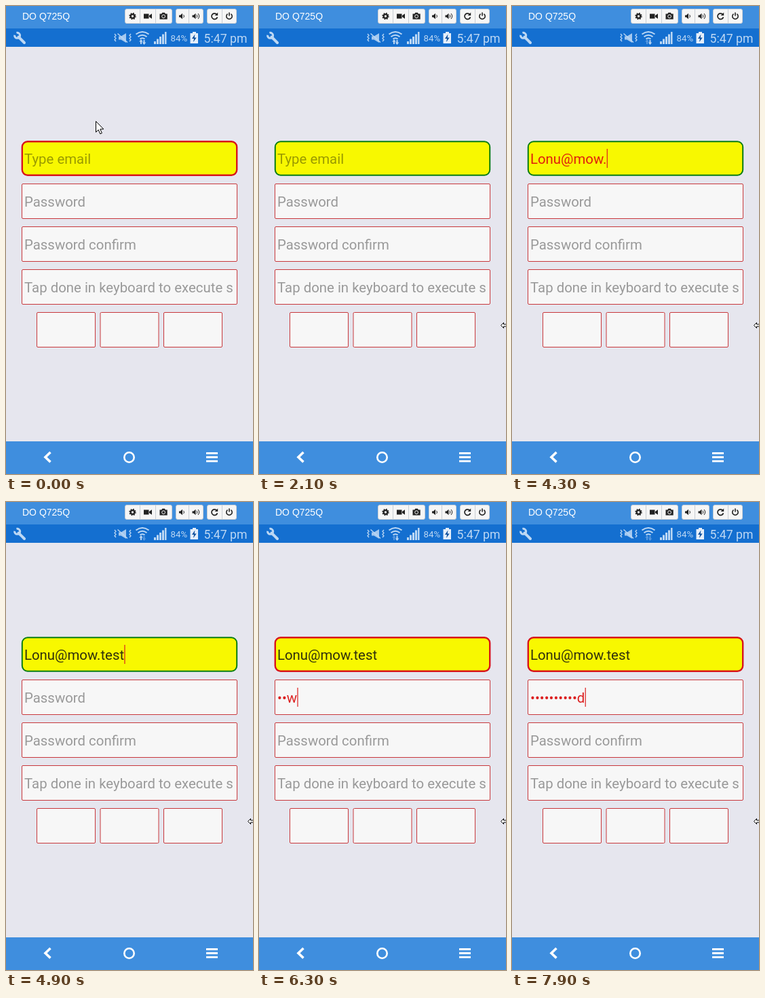
Write an HTML page that moves like this. It is 364 px wide and 688 px high and loops after 8000 ms.

```html
<!DOCTYPE html>
<html lang="en">
<head>
<meta charset="utf-8">
<title>Form validation</title>
<style>
  html, body { margin: 0; width: 100%; height: 100%; overflow: hidden; background: #e6e6ee; }
  svg { display: block; }
  text { font-family: Roboto, sans-serif; white-space: pre; }
  .field { font-size: 20.4px; }
  .hint { fill: rgba(0, 0, 0, .38); }
  .box { fill: #f7f7f7; stroke: #c8383c; }
  .line { fill: none; stroke: currentColor; }
  .status { color: #bdd8f4; fill: #bdd8f4; }
  .tools { color: #222; fill: #222; }
</style>
</head>
<body>
<svg width="364" height="688" viewBox="0 0 364 688">
  <rect width="364" height="688" fill="#e6e6ee"/>
  <rect width="364" height="33" fill="#3f8ede"/>
  <rect y="33" width="364" height="27" fill="#146fd0"/>
  <rect y="640" width="364" height="48" fill="#3f8ede"/>
  <text x="24" y="20" fill="#fff" style="font:14px 'Liberation Sans',Arial,sans-serif">DO Q725Q</text>

  <g class="tools">
    <g fill="#f6f6f6" stroke="#c9ced4">
      <rect x="175.5" y="4.5" width="69" height="21" rx="2.5"/>
      <rect x="250.5" y="4.5" width="40" height="21" rx="2.5"/>
      <rect x="296.5" y="4.5" width="43" height="21" rx="2.5"/>
      <path d="M197.5 5v20M220.5 5v20M269.5 5v20M318.5 5v20"/>
    </g>
    <g class="line">
      <circle cx="186.5" cy="15" r="2.8" stroke-width="2.2"/>
      <circle cx="186.5" cy="15" r="4.4" stroke-width="1.6" stroke-dasharray="1.73"/>
      <path d="M261.5 12.8q2 2.2 0 4.4M281 12.8q2 2.2 0 4.4M283 11q3.4 4 0 8"/>
      <path d="M310.5 12.2a4.3 4.3 0 1 0 1 4" stroke-width="1.7"/>
      <path d="M326.6 11.6a4.2 4.2 0 1 0 4.8 0M329 9.5v5" stroke-width="1.6"/>
    </g>
    <path d="M203 11.5h7.5v7H203zM211 14l4-2.8v7.6l-4-2.8z"/>
    <path d="M226.5 11.5h2.8l1-1.8h3.6l1 1.8h2.8v8h-11.2z"/>
    <circle cx="232.1" cy="15.2" r="2.4" fill="none" stroke="#f6f6f6"/>
    <path d="M255 13.4h2l3-2.7v8.6l-3-2.7h-2zM274.5 13.4h2l3-2.7v8.6l-3-2.7h-2z"/>
    <path d="M312.2 9.5v4.6h-4.6z"/>
  </g>

  <g class="status">
    <path class="line" d="M18.5 45.5l8.5 8.5" stroke-width="4" stroke-linecap="round"/>
    <path class="line" d="M15.5 39.5a4 4 0 1 1-2.8 3.2" stroke-width="3"/>
    <g class="line" stroke-width="1.3">
      <path d="M160 41l2 2.2-2 2.2 2 2.2-2 2.2 2 2.2M184 41l-2 2.2 2 2.2-2 2.2 2 2.2-2 2.2"/>
      <path d="M164.5 40.5l14.500 13"/>
      <path d="M191.5 41.500q9.500-7 19 0M194.500 45.200q6.500-5 13 0M197.500 48.500q3.500-2.600 7 0" stroke-width="2"/>
    </g>
    <path d="M166 44.500h3.500l7.500-4.500v14l-7.500-4.500h-3.500z" opacity=".85"/>
    <path id="up" d="M199 49l2.800 3.500h-1.800v3.500h-2v-3.500h-1.800z"/>
    <path id="down" d="M203.500 57l2.800-3.500h-1.800v-3.500h-2v3.500h-1.800z"/>
    <path d="M218 52h3v4h-3zM222 48.500h3v7.500h-3zM226 45h3v11h-3zM230 41.500h3v14.500h-3zM234 38h2.500v18h-2.500z"/>
    <text x="242.500" y="52" font-size="13.300">84%</text>
    <path d="M275 38h5v2h3v15h-11.500v-15h3.500z" fill="#e4eefa"/>
    <path d="M278.500 41.500l-4.500 6.500h3l-1 5 4.700-6.500h-3z" fill="#0d4f9c"/>
    <text x="291.500" y="53.500" font-size="17.700">5:47 pm</text>
  </g>

  <rect id="emailBox" x="23.800" y="199.300" width="316.400" height="49.400" rx="8" fill="#f8f800"/>
  <g class="box" id="boxes"></g>
  <g class="field">
    <text id="email" x="27" y="232"></text>
    <text id="password" x="27" y="295"></text>
    <text class="hint" x="27" y="358">Password confirm</text>
    <text class="hint" x="27" y="421">Tap done in keyboard to execute s</text>
  </g>
  <rect id="caret" width="1.200" height="28" fill="#dc2020"/>

  <g class="line" color="#fff">
    <path d="M65.500 656l-7.500 7.200 7.500 7.200" stroke-width="3.600"/>
    <circle cx="181.500" cy="663.500" r="7.200" stroke-width="2.600"/>
    <path d="M295 657.500h17M295 663.300h17M295 669.100h17" stroke-width="2.900"/>
  </g>

  <g fill="#fff" stroke="#000">
    <path id="arrow" d="M.5 .5v16l3.700-3.500 2.600 6 2.600-1.100-2.600-5.900h5z"/>
    <path id="resize" d="M356.500 469.500l4-4v2.500h5v3h-5v2.500z"/>
  </g>
</svg>

<script>
const LOOP = 8000, EMAIL_FOCUS = 1500, PASSWORD_FOCUS = 5100;
const $ = id => document.getElementById(id);

const email = {
  node: $('email'), hint: 'Type email', value: 'Lonu@mow.test', caretY: 210,
  keys: [2400, 2700, 3000, 3300, 3600, 3900, 4000, 4000, 4300, 4400, 4600, 4700, 4900]
};
const password = {
  node: $('password'), hint: 'Password', value: 'newpassword', caretY: 273,
  keys: [5900, 6000, 6300, 6400, 6600, 6800, 7000, 7300, 7500, 7600, 7900]
};
// Start time and the lit data arrows: 1 = up, 2 = down.
const traffic = [[0, 3], [1800, 1], [2100, 3], [2700, 0], [3500, 2], [4600, 1],
                 [5300, 3], [5900, 2], [6800, 1], [7300, 0]];

function addBox(x, y, width) {
  const box = document.createElementNS('http://www.w3.org/2000/svg', 'rect');
  Object.entries({ x, y, width, height: 51, rx: 1.5 }).forEach(([k, v]) => box.setAttribute(k, v));
  $('boxes').append(box);
}
[261.5, 324.5, 387.5].forEach(y => addBox(23.5, y, 317));
[45.5, 139, 232.5].forEach(x => addBox(x, 450.5, 86));

const show = (id, on) => $(id).style.display = on ? '' : 'none';

function drawField(field, t, format, color) {
  const typed = field.value.slice(0, field.keys.filter(k => k <= t).length);
  field.node.textContent = typed ? format(typed) : field.hint;
  field.node.setAttribute('class', typed ? '' : 'hint');
  field.node.setAttribute('fill', color(typed));
  field.width = typed ? field.node.getComputedTextLength() : 0;
}

function drawCaret(t) {
  const active = t < PASSWORD_FOCUS ? email : password;
  const focus = active === email ? EMAIL_FOCUS : PASSWORD_FOCUS;
  const lastInput = Math.max(focus, ...active.keys.filter(k => k <= t));
  show('caret', t >= EMAIL_FOCUS && (t - lastInput) % 1000 < 500);
  $('caret').setAttribute('x', 27.3 + active.width);
  $('caret').setAttribute('y', active.caretY);
}

function drawPointer(t) {
  const p = Math.min(t / 1000, 1), ease = p * p * (3 - 2 * p);
  $('arrow').setAttribute('transform', `translate(${132 + 225 * ease} ${169 + 293 * ease})`);
  show('arrow', p < 1);
  show('resize', p === 1);
}

function draw(t) {
  drawField(email, t, s => s, s => /\.\w{3,}$/.test(s) ? '#30300c' : '#e0200c');
  drawField(password, t, s => '•'.repeat(s.length - 1) + s.slice(-1), () => '#dc2020');
  drawCaret(t);
  drawPointer(t);

  const focused = t >= EMAIL_FOCUS && t < PASSWORD_FOCUS;
  $('emailBox').setAttribute('stroke', focused ? '#0a7d14' : '#d8141c');
  $('emailBox').setAttribute('stroke-width', focused ? 2 : 2.4);

  const lit = traffic.filter(([start]) => start <= t).pop()[1];
  $('up').setAttribute('opacity', lit & 1 ? 1 : .4);
  $('down').setAttribute('opacity', lit & 2 ? 1 : .4);
}

function tick() {
  draw(Math.floor(performance.now() % LOOP / 100) * 100);
  requestAnimationFrame(tick);
}
tick();
</script>
</body>
</html>
```
